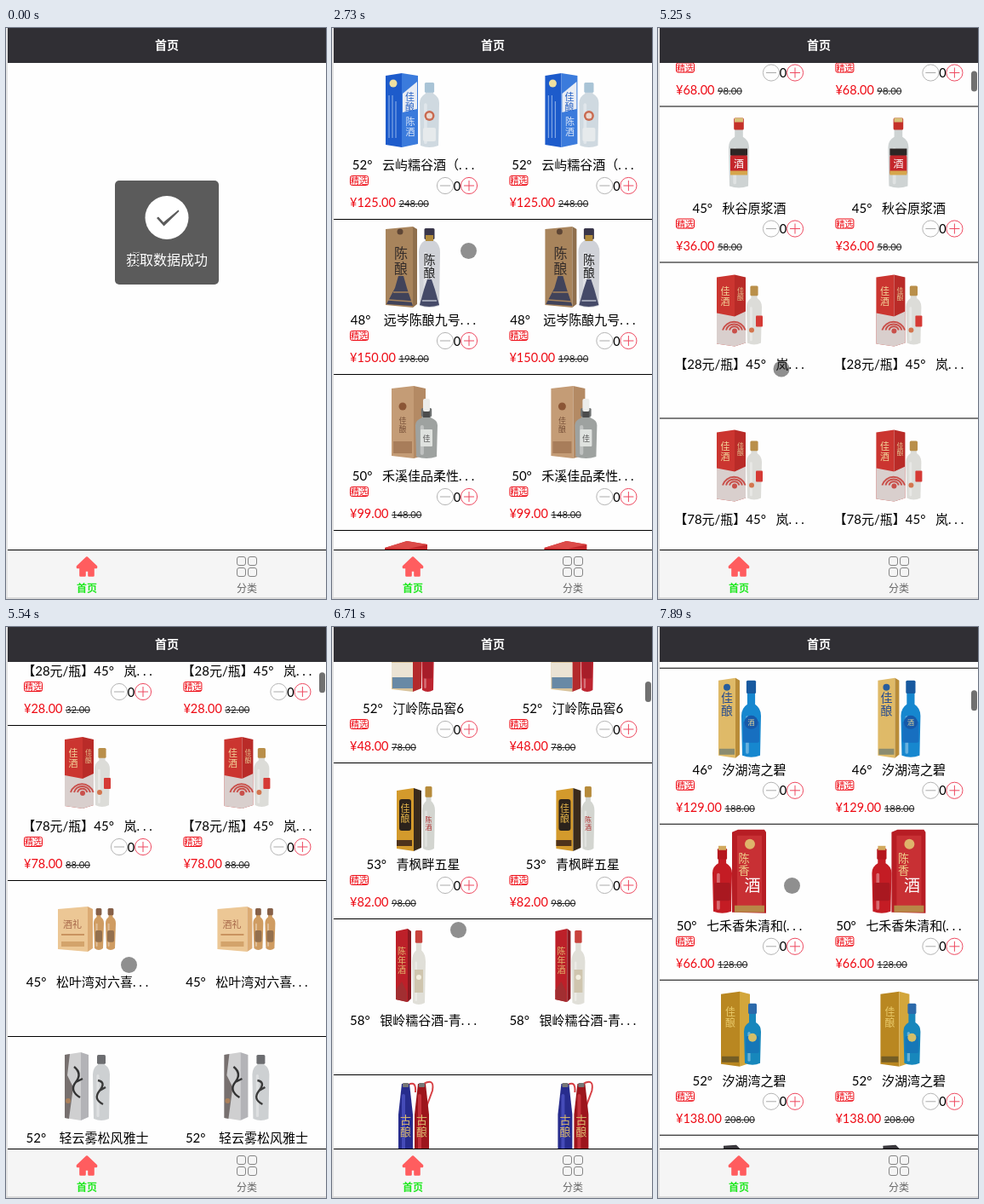
These frames come from a looping animation (376 by 670 pixels, 8 s). An HTML page with a canvas:

```html
<!DOCTYPE html>
<html lang="zh-CN">
<head>
<meta charset="utf-8">
<title>首页</title>
<style>
html, body { margin: 0; width: 100%; height: 100%; overflow: hidden; background: #fefefe; }
canvas { display: block; width: 376px; height: 670px; }
</style>
</head>
<body>
<canvas id="stage"></canvas>
<script>
const W = 376, H = 670, LOOP = 8000, TOP = 41, BOTTOM = 612, PITCH = 182.667, COLUMN = 187.4;
const FONT = 'Lato, "Noto Sans CJK SC", "Noto Sans CJK", sans-serif';
const RED = '#ee0a14';
const canvas = document.getElementById('stage');
const ratio = window.devicePixelRatio || 1;
canvas.width = W * ratio;
canvas.height = H * ratio;
const ctx = canvas.getContext('2d');
ctx.scale(ratio, ratio);

// ---- drawing helpers ----
function rect(x, y, w, h, fill, radius = 0) {
  ctx.fillStyle = fill;
  ctx.beginPath();
  ctx.roundRect(x, y, w, h, radius);
  ctx.fill();
}
function outline(x, y, w, h, stroke, radius) {
  ctx.strokeStyle = stroke;
  ctx.lineWidth = 1;
  ctx.beginPath();
  ctx.roundRect(x, y, w, h, radius);
  ctx.stroke();
}
function disc(x, y, r, fill) {
  ctx.fillStyle = fill;
  ctx.beginPath();
  ctx.arc(x, y, r, 0, 7);
  ctx.fill();
}
function shape(path, fill) {
  ctx.fillStyle = fill;
  ctx.fill(new Path2D(path));
}
function line(path, stroke, width = 1) {
  ctx.strokeStyle = stroke;
  ctx.lineWidth = width;
  ctx.stroke(new Path2D(path));
}
function text(value, x, y, size, fill, align = 'left', weight = 400) {
  ctx.font = `${weight} ${size}px ${FONT}`;
  ctx.textAlign = align;
  ctx.fillStyle = fill;
  ctx.fillText(value, x, y);
  return ctx.measureText(value).width;
}
function vertical(value, x, y, size, fill) {
  [...value].forEach((c, i) => text(c, x, y + i * size * 1.1, size, fill, 'center'));
}

// ---- product pictures, placed relative to the row top ----
function carton(x, y, w, h, front, side, sideWidth) {
  const edge = x + w - sideWidth, right = x + w, end = y + h;
  shape(`M${x} ${y + 3}L${edge} ${y}V${end}L${x} ${end - 3}Z`, front);
  shape(`M${edge} ${y}L${right} ${y + 3}V${end - 4}L${edge} ${end}Z`, side);
}
function bottle(x, y, w, h, body, cap, label, shoulder = .32) {
  const mid = x + w / 2, neck = w * .2, right = x + w, end = y + h;
  const slope = y + h * shoulder, full = slope + h * .1;
  shape(`M${mid - neck} ${y + 5}H${mid + neck}V${slope - h * .05}Q${right} ${slope} ${right} ${full}` +
    `L${right - 1} ${end - 2}Q${mid} ${end + 2} ${x + 1} ${end - 2}L${x} ${full}` +
    `Q${x} ${slope} ${mid - neck} ${slope - h * .05}Z`, body);
  rect(x + w * .22, full, w * .16, end - full - 4, 'rgba(255,255,255,.35)', 2);
  rect(mid - neck - 1, y, neck * 2 + 2, h * Math.min(.17, shoulder * .7), cap, 1.5);
  if (label) rect(x + 2, y + h * .53, w - 4, h * .28, label, 2);
}
const pictures = {
  blueBox() {
    carton(63, 12, 38, 87, '#1d5bcb', '#3b7bdc', 19);
    shape('M83 36L100 22V54L83 58Z', '#e9edf4');
    disc(72, 24, 4.5, '#efe0a0');
    line('M67 38V88M71 38V88M75 45V88', '#7fa5e4', 1.2);
    vertical('佳酿', 91.5, 44, 11, '#2560c4');
    vertical('陈酒', 92, 73, 11, '#dce7f8');
    bottle(103, 23, 23, 76, '#cfd9e0', '#a9c4d6', '', .22);
    disc(114.5, 62, 6, '#c96a50');
    disc(114.5, 62, 3.5, '#ead9d0');
    rect(107, 76, 15, 16, '#e6eaec', 2);
  },
  tanBox() {
    carton(63, 10, 37, 95, '#a8845c', '#8f6f4c', 5);
    disc(80, 16, 3.5, '#5e4636');
    vertical('陈酿', 81, 47, 16, '#342c2a');
    shape('M78 68H84L88 82L95 103L64 101L74 82Z', '#41435a');
    line('M66 96L94 98M72 87H90', '#a8845c', 1.5);
    bottle(102, 12, 25, 93, '#d0d2d8', '#39364a', '', .2);
    rect(110, 20, 9, 7, '#b08a3c');
    vertical('陈酿', 114.5, 54, 14, '#222');
    shape('M112 72H117L121 84L126 102Q114 106 103 102L108 84Z', '#454a68');
    line('M106 97H123', '#b9bccb', 1.5);
  },
  amberBox() {
    carton(70, 14, 40, 85, '#c49c76', '#b48a64', 14);
    rect(72, 79, 22, 14, '#a87d5a');
    disc(83, 38, 4.5, '#8b5636');
    vertical('佳酿', 83, 58, 9, '#775038');
    bottle(98, 40, 26, 59, '#9ea2a0', '#6f7272', '', .24);
    rect(107, 29, 8, 15, '#ececea', 2);
    rect(107, 44, 8, 7, '#4c4c4c');
    rect(104, 65, 14, 20, '#dfe2df', 1);
    vertical('佳', 111, 79, 9, '#555');
  },
  redTop() {
    shape('M62 21L88 13L112 17V96L88 100L62 96Z', '#c4272b');
    shape('M62 21L88 13L112 17L90 22Z', '#dd4a48');
    rect(68, 42, 18, 32, '#d6b574');
    bottle(113, 24, 15, 75, '#bd2528', '#d6b574', '#ead7a4');
  },
  redWhite() {
    carton(69, 15, 34, 84, '#cb3530', '#b92b28', 13);
    shape('M69 60L90 64L103 58V95L90 99L69 96Z', '#d9cfcd');
    for (const r of [14, 10, 6]) {
      line(`M${90 - r} 80A${r} ${r} 0 0 1 ${90 + r * .9} 80`, '#c9504b', 2);
    }
    disc(90, 81, 3, '#c9504b');
    vertical('佳酒', 79, 38, 11, '#f3d69b');
    vertical('佳酿', 97, 36, 8, '#e6c58f');
    bottle(104, 28, 18, 69, '#dcdcd8', '#b98f4a', '', .26);
    rect(115, 63, 8, 13, '#d53a35', 1);
    disc(110, 80, 3, '#d3764f');
  },
  pair() {
    carton(61, 31, 41, 53, '#ecc795', '#dcab74', 6);
    text('酒礼', 78, 56, 11, '#a8694a', 'center');
    rect(65, 63, 27, 2, '#c9935f');
    rect(65, 72, 27, 6, '#d3a36b');
    for (const x of [103, 117]) {
      bottle(x, 33, 12, 49, '#cf9c62', '#866048', '#94704e', .26);
    }
  },
  ink() {
    carton(69, 19, 28, 80, '#cfcfd0', '#b3b3b7', 9);
    shape('M69 22L75 21L72 46L79 60L74 97L69 96Z', '#77706f');
    line('M80 36Q90 44 82 54T87 72M82 54L90 50', '#333', 2.4);
    disc(73, 76, 3, '#ab805b');
    bottle(102, 22, 20, 77, '#cdd0d2', '#6c6d70', '', .2);
    line('M108 52Q118 54 110 64T114 80M110 64L117 60', '#3a3a3a', 2.4);
  },
  cream() {
    carton(70, 15, 35, 85, '#d9c39a', '#b32a2c', 10);
    rect(70, 66, 25, 17, '#ebe3d4');
    rect(71, 83, 24, 13, '#6889a5');
    disc(83, 52, 7, '#b94335');
    bottle(105, 18, 15, 82, '#bd2530', '#d3ab58', '#a71d29', .24);
  },
  darkGold() {
    carton(76, 30, 29, 74, '#d39a2c', '#3a2b1c', 9);
    rect(79, 43, 14, 37, '#2b221b', 3);
    vertical('佳酿', 86, 58, 11, '#e9b84b');
    rect(76, 91, 18, 7, '#4f331b');
    bottle(106, 28, 15, 75, '#d3d5d0', '#b68b3b', '', .28);
    vertical('陈酒', 113.5, 70, 8, '#ae3030');
  },
  slimRed() {
    carton(75, 12, 18, 86, '#bd2029', '#8b1820', 4);
    vertical('陈年酒', 82, 42, 10, '#e4bd71');
    shape('M75 84L82 74L88 86V98L75 95Z', '#a22e31');
    bottle(94, 14, 16, 87, '#e0dfd8', '#c8423c');
    rect(97, 60, 10, 27, '#cfc5ae');
    disc(102, 69, 3, '#f3eee0');
  },
  twins() {
    line('M106 13Q121 4 118 20L111 39M90 13Q99 8 98 22', '#d74045', 2);
    for (const [x, dark, bright] of [[78, '#272c8d', '#454bb8'], [97, '#9d151c', '#c4333b']]) {
      shape(`M${x + 4} 12H${x + 13}L${x + 17} 48V99Q${x + 8} 103 ${x} 99V48Z`, dark);
      rect(x + 4, 24, 4, 69, bright, 2);
      rect(x + 5, 11, 7, 5, '#777', 1);
      vertical('古酿', x + 8.5, 59, 13, '#d9b86d');
      rect(x + 1, 88, 15, 7, '#987351');
    }
  },
  redLabel() {
    bottle(83, 14, 24, 82, '#ced3d3', '#c43029', '#c4262b');
    rect(90, 14, 10, 5, '#d7c078');
    rect(85, 50, 20, 8, '#2d2625');
    text('酒', 95, 72, 12, '#fff', 'center');
    rect(85, 76, 20, 5, '#d6a64c');
  },
  clear() {
    bottle(86, 12, 18, 88, '#dad9d2', '#a27b38', '#e4b83c', .28);
    rect(88, 57, 14, 9, '#f0d889');
    text('佳酒', 95, 80, 7, '#8b6430', 'center');
  },
  seaBlue() {
    carton(71, 12, 25, 94, '#dfba68', '#b98c38', 5);
    vertical('佳酿', 81, 40, 14, '#284d8f');
    disc(81, 23, 4, '#285d9c');
    rect(72, 95, 18, 7, '#8b8c6f');
    bottle(98, 15, 23, 90, '#1687cf', '#17599f', '#176fc0', .36);
    disc(109.5, 64, 8, '#1759a9');
    text('酒', 109.5, 67, 8, '#e3d498', 'center');
  },
  scarlet() {
    bottle(64, 29, 23, 76, '#c41c24', '#b5161d', '#a91820', .28);
    rect(71, 26, 9, 5, '#d2aa5e');
    shape('M87 10L94 7H125L127 10V105L87 104Z', '#b71d24');
    rect(93, 14, 29, 87, '#c83034');
    disc(108, 24, 6, '#dfb56b');
    vertical('陈香', 101, 45, 13, '#f0d18d');
    text('酒', 111, 79, 19, '#fff', 'center');
    rect(90, 96, 35, 8, '#b88747');
  },
  goldBlue() {
    carton(74, 15, 34, 88, '#b98721', '#d3a63b', 12);
    vertical('佳酿', 85, 43, 12, '#e9ca6a');
    rect(75, 91, 20, 7, '#745d25');
    bottle(101, 29, 20, 72, '#1787bc', '#2b69aa', '#1677b7', .36);
    disc(111, 69, 5, '#d4bf68');
  },
  dark() {
    shape('M77 13L92 12L96 16V98H77Z', '#3a383d');
    bottle(99, 24, 18, 75, '#c9cccd', '#444', '#8a8a8a');
  }
};

// Degree signs take a full-width cell; CUT marks a clipped title.
const DEG = '°   ', CUT = '. . .';
const items = [
  [`52${DEG}云屿糯谷酒（${CUT}`, 'blueBox', 125, 248],
  [`48${DEG} 远岑陈酿九号${CUT}`, 'tanBox', 150, 198],
  [`50${DEG}禾溪佳品柔性${CUT}`, 'amberBox', 99, 148],
  [`42${DEG}林溪小窖酒`, 'redTop', 58, 88],
  [`52${DEG}竹影清香酒`, 'clear', 68, 98],
  [`45${DEG}秋谷原浆酒`, 'redLabel', 36, 58],
  [`【28元/瓶】45${DEG}岚${CUT}`, 'redWhite', 28, 32],
  [`【78元/瓶】45${DEG}岚${CUT}`, 'redWhite', 78, 88],
  [`45${DEG}松叶湾对六喜${CUT}`, 'pair', 88, 128],
  [`52${DEG} 轻云雾松风雅士`, 'ink', 168, 198],
  [`50${DEG}霜林陈香酒`, 'amberBox', 98, 138],
  [`42${DEG}溪桥米香酒`, 'clear', 46, 68],
  [`53${DEG}晚枫酱香酒`, 'scarlet', 128, 168],
  [`52${DEG}汀岭陈品窖6`, 'cream', 48, 78],
  [`53${DEG}青枫畔五星`, 'darkGold', 82, 98],
  [`58${DEG}银岭糯谷酒-青${CUT}`, 'slimRed', 198, 208],
  [`52${DEG}汀岭古坛酒韵-${CUT}`, 'twins', 78, 88],
  [`52${DEG}七禾露酒之源${CUT}`, 'redLabel', 58, 78],
  [`48${DEG}素瓶黑麦酒`, 'clear', 38, 58],
  [`42${DEG}汐湖湾之碧`, 'seaBlue', 118, 168],
  [`46${DEG}汐湖湾之碧`, 'seaBlue', 129, 188],
  [`50${DEG}七禾香朱清和(${CUT}`, 'scarlet', 66, 128],
  [`52${DEG}汐湖湾之碧`, 'goldBlue', 138, 208],
  [`52${DEG}远山黑陶酒`, 'dark', 108, 158]
];

// ---- timeline, in screen refresh steps ----
const stepAt = ms => Math.floor((ms - 490) / 147.9);
const scrollKeys = [[27, 0], [28, 60], [30, 520], [34, 1205], [35, 1300], [37, 1720],
  [42, 2439], [43, 2530], [46, 2902], [50, 3646.2]];
const pointerKeys = [[4, 152, 271], [5, 146, 240], [6, 134, 190], [7, 145, 168], [8, 164, 185],
  [9, 163, 225], [10, 161, 266], [14, 161, 266], [15, 160.5, 261.5], [16, 161, 186], [18, 161, 186],
  [19, 157, 300], [20, 155, 392], [21, 161, 367], [27, 161, 367], [28, 158, 330], [30, 150, 265],
  [32, 145, 400], [34, 144.5, 396.5], [36, 146, 300], [38, 150, 270], [40, 149, 400],
  [42, 148.5, 355.5], [44, 156, 255], [46, 160.5, 270.5], [48, 158, 400], [50, 157.5, 303.5]];
function sample(keys, step) {
  const next = keys.findIndex(k => k[0] > step);
  if (next === 0) return keys[0].slice(1);
  if (next < 0) return keys.at(-1).slice(1);
  const a = keys[next - 1], b = keys[next], p = (step - a[0]) / (b[0] - a[0]);
  return a.slice(1).map((v, i) => v + (b[i + 1] - v) * p);
}
function countFor(index, step) {
  if (index === 0) return (step >= 17) + (step >= 18);
  return index === 1 && step >= 26 ? 1 : 0;
}

// ---- page parts ----
function details([, , price, old], count, icons) {
  outline(21.5, 132.5, 21, 11, RED, 2);
  text('精选', 32, 142, 10, RED, 'center');
  if (icons) {
    outline(123.4, 134.4, 19.2, 19.2, '#b5b5b5', 9.6);
    line('M127 144H139', '#aaa');
    outline(151.4, 134.4, 19.2, 19.2, '#ee4960', 9.6);
    line('M155 144H167M161 138V150', '#ee4960');
  }
  text(count, 147, 149.5, 14.5, '#000', 'center');
  const x = 24.5 + text(`¥${price}.00`, 21, 169, 14.5, RED);
  const width = text(`${old}.00`, x, 169, 11.3, '#222');
  line(`M${x} 165.5h${width}`, '#222');
}
function list(step) {
  const [scroll] = sample(scrollKeys, step);
  const rowEdge = i => TOP + PITCH * i;
  const eachCell = draw => items.forEach((item, i) => {
    const y = Math.floor(rowEdge(i)) - scroll;
    if (y > BOTTOM || y < TOP - PITCH - 2) return;
    for (const x of [0, COLUMN]) {
      ctx.save();
      ctx.translate(x, y);
      draw(item, i);
      ctx.restore();
    }
  });
  ctx.save();
  ctx.beginPath();
  ctx.rect(2, TOP, W - 2, BOTTOM - TOP);
  ctx.clip();
  eachCell(([title, picture]) => {
    if (step >= 2) pictures[picture]();
    text(title, 95.5, 125.3, 15, '#000', 'center');
  });
  items.forEach((_, i) => rect(2, Math.round(rowEdge(i + 1)) - scroll, W - 2, 1, '#000'));
  // While scrolling fast, the lower part has not painted its details yet.
  ctx.beginPath();
  ctx.rect(2, TOP, W - 2, step > 30 && step < 48 ? 387 - TOP : BOTTOM - TOP);
  ctx.clip();
  eachCell((item, i) => details(item, countFor(i, step), step >= 2));
  ctx.restore();
  if (step >= 28) rect(368, 43 + scroll * .0086, 7, 24, '#707070', 3.5);
}
function chrome() {
  rect(2, 0, W - 2, TOP, '#302f34');
  text('首页', 189, 25, 14, '#fff', 'center', 700);
  rect(2, BOTTOM, W - 2, 56, '#f5f5f5');
  rect(2, BOTTOM, W - 2, 1, '#000');
  ctx.lineJoin = 'round';
  const home = 'M95 621.5L84 632V633H87.5V642.5H92.5V636.5H97.5V642.5H102.5V633H106V632Z';
  shape(home, '#ff5d5f');
  line(home, '#ff5d5f', 2.6);
  text('首页', 95, 661.5, 12, '#1fe81f', 'center', 700);
  for (const x of [271.5, 284.5]) {
    for (const y of [620.5, 633.5]) outline(x, y, 10, 10, '#858585', 2.5);
  }
  text('分类', 283, 661.5, 12, '#666', 'center');
  rect(0, 0, 2, H, '#e3e3e3');
  rect(0, 668, W, 2, '#d9d9d9');
}
function toast() {
  rect(128, 179, 122, 122, '#5b5b5b', 5);
  disc(189, 222.5, 25.5, '#fff');
  shape('M177 223L179 221.5L185 228L202.5 213.5L203.5 215L185.5 232.5Z', '#5b5b5b');
  text('获取数据成功', 189, 278, 16, '#fff', 'center');
  const beam = 'M149 264Q152 264 153 266Q154 264 157 264M153 266V276M149 278Q152 278 153 276Q154 278 157 278M151 271H155';
  line(beam, '#ddd', 2.6);
  line(beam, '#222', 1.1);
}
function render(ms) {
  const step = stepAt(ms);
  rect(0, 0, W, H, '#fefefe');
  if (step >= 0) list(step);
  chrome();
  if (step < 2) toast();
  else disc(...sample(pointerKeys, step), 9.5, 'rgba(40,40,40,.52)');
}
function tick() {
  render(performance.now() % LOOP);
  requestAnimationFrame(tick);
}
tick();
</script>
</body>
</html>
```
